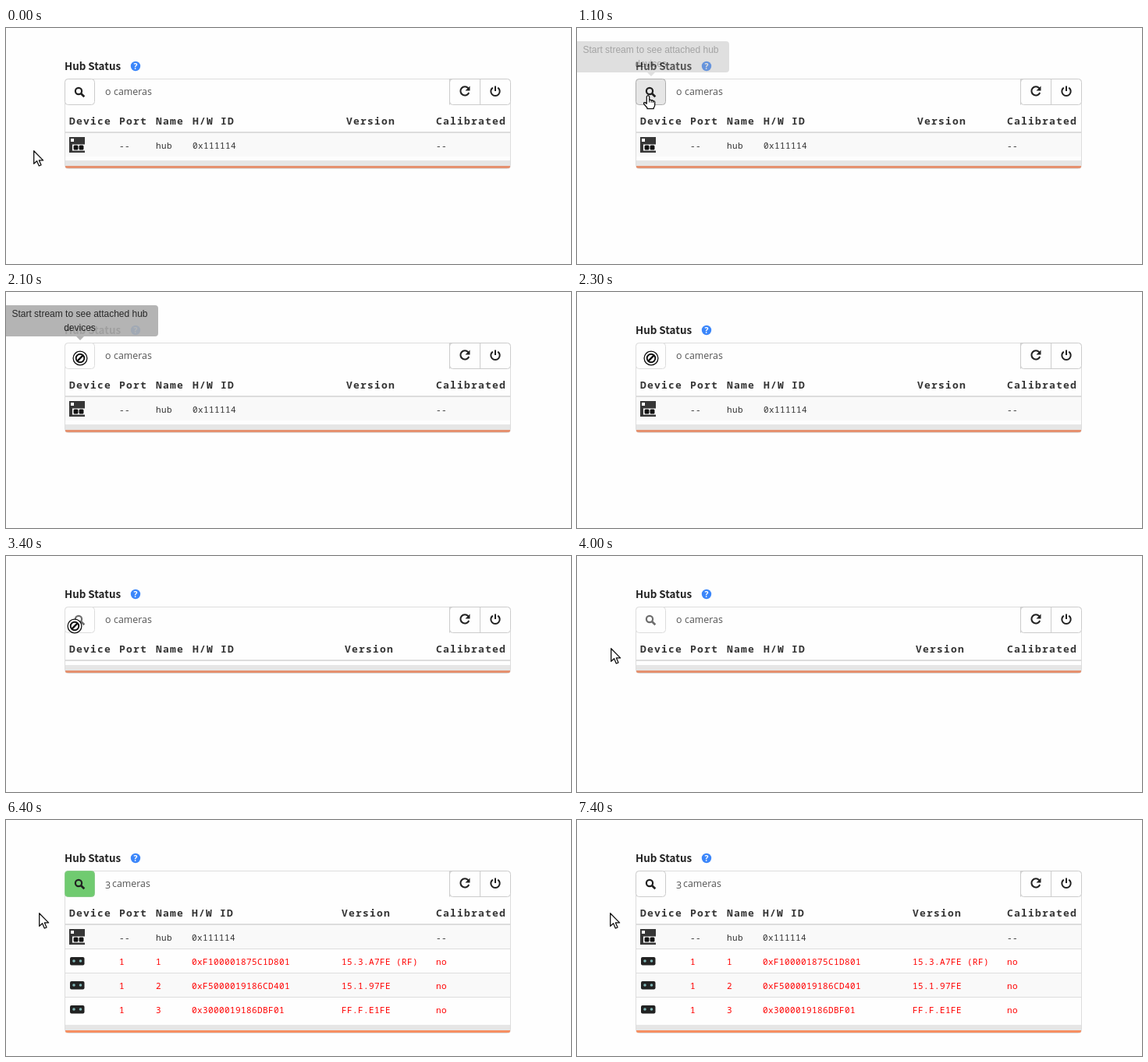
These frames come from a looping animation (724 by 303 pixels, 9 s). An HTML page:

```html
<!DOCTYPE html>
<html lang="en">
<head>
<meta charset="utf-8">
<title>Hub Status</title>
<style>
html, body { margin: 0; width: 100%; height: 100%; overflow: hidden; background: #fefefe; }
svg { display: block; }
text { white-space: pre; }
.title { font: 700 13.4px "Noto Sans CJK JP", "Noto Sans", sans-serif; fill: #222; }
.count { font: 12.4px "Open Sans", "Noto Sans", sans-serif; fill: #555; }
.head { font: 700 13px "Noto Sans Mono", monospace; letter-spacing: 1.2px; fill: #333; }
.cell { font: 11px "Noto Sans Mono", monospace; letter-spacing: .4px; fill: #333; }
.red .cell { fill: #f00; }
.tip { font: 12px "Liberation Sans", Arial, sans-serif; text-anchor: middle; fill: #111; }
.button { fill: #fefefe; stroke: #ccc; }
.icon { fill: none; stroke: #222; stroke-width: 2; }
.cursor { fill: #fff; stroke: #111; stroke-width: 1.3; stroke-linejoin: round; }
</style>
</head>
<body>
<svg width="724" height="303" viewBox="0 0 724 303">
  <text class="title" x="75" y="54">Hub Status</text>
  <circle cx="166" cy="49" r="6.2" fill="#3b86fa"/>
  <text x="166" y="52.8" font-family="Open Sans, sans-serif" font-size="10.5" font-weight="700" fill="#fff" text-anchor="middle">?</text>

  <rect id="frame" x="75.5" y="65.5" width="571" rx="4" fill="none" stroke="#ddd"/>
  <path class="button" d="M568.500 98.500V65.500H642.500a4 4 0 0 1 4 4V94.500a4 4 0 0 1-4 4H572.500a4 4 0 0 1-4-4V69.500a4 4 0 0 1 4-4M607.500 65.500v33"/>
  <path class="icon" d="M592.300 77.300A5.600 5.600 0 1 0 593.200 83"/>
  <path d="M594.500 74.500v6h-6z" fill="#222"/>
  <path class="icon" d="M623.800 76.700a5.700 5.700 0 1 0 6.400 0M627 74.500v6.500"/>

  <rect id="search" class="button" x="75.500" y="65.500" width="38" height="33" rx="4"/>
  <g id="glass" class="icon">
    <circle cx="93" cy="81" r="4.100" stroke-width="2.200"/>
    <path d="M96.200 84.200l4.100 4.100" stroke-width="2.700"/>
  </g>
  <text id="digit" class="count" x="127"></text>
  <text id="cameras" class="count" y="86">cameras</text>

  <g id="heads"></g>
  <path d="M76 134h570" stroke="#ddd" stroke-width="2"/>
  <g id="rows"></g>
  <g id="footer">
    <path d="M76 0h570v7h-570z" fill="#e6e6e6"/>
    <path id="accent" d="M76 7h570v1q0 2-2 2h-566q-2 0-2-2z"/>
  </g>

  <g id="tooltip">
    <path d="M-5 17H191a4 4 0 0 1 4 4V53a4 4 0 0 1-4 4H100l-5 5-5-5H-5z" fill="#adadad"/>
    <text class="tip" x="94.500" y="32">Start stream to see attached hub</text>
    <text class="tip" x="94.500" y="50">devices</text>
  </g>

  <g id="arrow" class="cursor">
    <path d="M.7 .8v16.500l3.900-3.500 2.700 6.200 2.700-1.200-2.600-5.900h5.200z"/>
  </g>
  <g id="hand" class="cursor">
    <path d="M-1.700 2q1.700-2.700 3.400 0v4.500q1.500-1 2.500.5 1.500-.7 2.300.7 2.200-.4 2.200 1.800v3.500q0 2-1.500 3.500v1.200h-8.200v-1.200l-4.300-5q-.8-2.300 1.500-1.900l2.100 1.500z"/>
    <path d="M1.700 6.500v3M4.200 7v2.800M6.500 7.700v2.300" stroke-width="1"/>
  </g>
  <g id="blocked" class="cursor">
    <circle r="8.900"/>
    <circle r="5.300" stroke-width="1.900"/>
    <path d="M-3.600 3.600l7.200-7.200" stroke-width="2.400"/>
  </g>
</svg>
<script>
const LOOP = 9000, STEP = 100;
const el = id => document.getElementById(id);
const set = (id, attrs) => {
  for (const name in attrs) el(id).setAttribute(name, attrs[name]);
};
const show = (id, visible) => set(id, { visibility: visible ? 'visible' : 'hidden' });
const text = (cls, x, y, value) => `<text class="${cls}" x="${x}" y="${y}">${value}</text>`;
const mix = (a, b, k) => a.map((v, i) => v + (b[i] - v) * k);
const progress = (t, from, to) => Math.min(1, Math.max(0, (t - from) / (to - from)));
const smooth = u => u * u * (3 - 2 * u);

const titles = ['Device', 'Port', 'Name', 'H/W ID', 'Version', 'Calibrated'];
const devices = [
  ['--', 'hub', '0x111114', '', '--'],
  ['1', '1', '0xF100001875C1D801', '15.3.A7FE (RF)', 'no'],
  ['1', '2', '0xF5000019186CD401', '15.1.97FE', 'no'],
  ['1', '3', '0x3000019186DBF01', 'FF.F.E1FE', 'no']
];
// One entry per table state: hub only, empty, all devices.
const layouts = [
  { rows: 1, id: 239, version: 436, foot: 170, accent: '#e5916f' },
  { rows: 0, id: 239, version: 434, foot: 140, accent: '#e5916f' },
  { rows: 4, id: 238, version: 430, foot: 263, accent: '#f68f62' }
];

const hubIcon = `<path d="M81 140h20v20h-20z" fill="#363636"/>
  <path d="M83 142h4v4h-4zM85 149.500h16v8h-16z" fill="#fff"/>
  <rect x="86.500" y="150.500" width="6" height="6" rx="1.500" fill="#111"/>
  <rect x="93.500" y="150.500" width="6" height="6" rx="1.500" fill="#111"/>`;
const cameraIcon = y => `<rect x="82" y="${y - 5}" width="18.500" height="10.500" rx="2" fill="#222"/>
  <circle cx="87" cy="${y}" r="1.800" fill="#7fb5b5"/><circle cx="95.500" cy="${y}" r="1.800" fill="#7fb5b5"/>`;

function buildTable({ rows, id, version, foot, accent }) {
  const columns = [81, 145, 192, id, version, 551];
  el('heads').innerHTML = titles.map((title, i) => text('head', columns[i], 124, title)).join('');
  el('rows').innerHTML = devices.slice(0, rows).map((device, i) => {
    const top = 135 + i * 31;
    const stripe = i % 2 ? '' : `<path d="M76 ${top}h570v30h-570z" fill="#f9f9f9"/>`;
    const line = i ? `<path d="M76 ${top - .5}h570" stroke="#ddd"/>` : '';
    const cells = device.map((value, c) => text('cell', columns[c + 1], top + 20, value)).join('');
    return `<g class="${i ? 'red' : ''}">${stripe}${line}${i ? cameraIcon(top + 15) : hubIcon}${cells}</g>`;
  }).join('');
  set('frame', { height: foot + 10 - 65 });
  set('footer', { transform: `translate(0 ${foot})` });
  set('accent', { fill: accent });
}

function cursorAt(t) {
  if (t < 3300) return mix([35, 157], [95, 82], smooth(progress(t, 300, 1240)));
  if (t < 4700) return mix([95, 85], [43, 118], progress(t, 3300, 4000));
  return [42, 119];
}

function buttonStyle(t, over, disabled) {
  if (t >= 5300 && t < 5400 || t >= 6400 && t < 7400) return ['#70cb70', '#8c8'];
  if (disabled) return ['#fefefe', '#ddd'];
  if (t >= 1800 && t < 1900) return ['#d4d4d4', '#8c8c8c'];
  return over ? ['#e6e6e6', '#adadad'] : ['#fefefe', '#ccc'];
}

let current;
function draw(t) {
  const layout = layouts[t < 2400 ? 0 : t < 5400 ? 1 : 2];
  if (layout !== current) buildTable(current = layout);

  const disabled = t >= 2100 && t < 5300;
  let [x, y] = cursorAt(t);
  const over = x > 75 && x < 114 && y > 65 && y < 99;
  if (over && disabled && t < 3300) y = 85;
  const shape = !over ? 'arrow' : disabled ? 'blocked' : 'hand';
  for (const id of ['arrow', 'hand', 'blocked']) show(id, id === shape);
  set(shape, { transform: `translate(${Math.round(x)} ${Math.round(y)})` });

  const [fill, stroke] = buttonStyle(t, over, disabled);
  el('search').style.cssText = `fill:${fill};stroke:${stroke}`;
  set('glass', { opacity: disabled ? .65 : 1 });

  const found = t >= 5300;
  el('digit').textContent = found ? '3' : 'o';
  set('digit', { y: found ? 88 : 86 });
  set('cameras', { x: found ? 136 : 138 });

  const fade = progress(t, 1035, 1190) * (1 - progress(t, 2100, 2250));
  set('tooltip', { opacity: .9 * fade });
}

function tick() {
  draw(Math.floor(performance.now() % LOOP / STEP) * STEP);
  requestAnimationFrame(tick);
}
tick();
</script>
</body>
</html>
```
